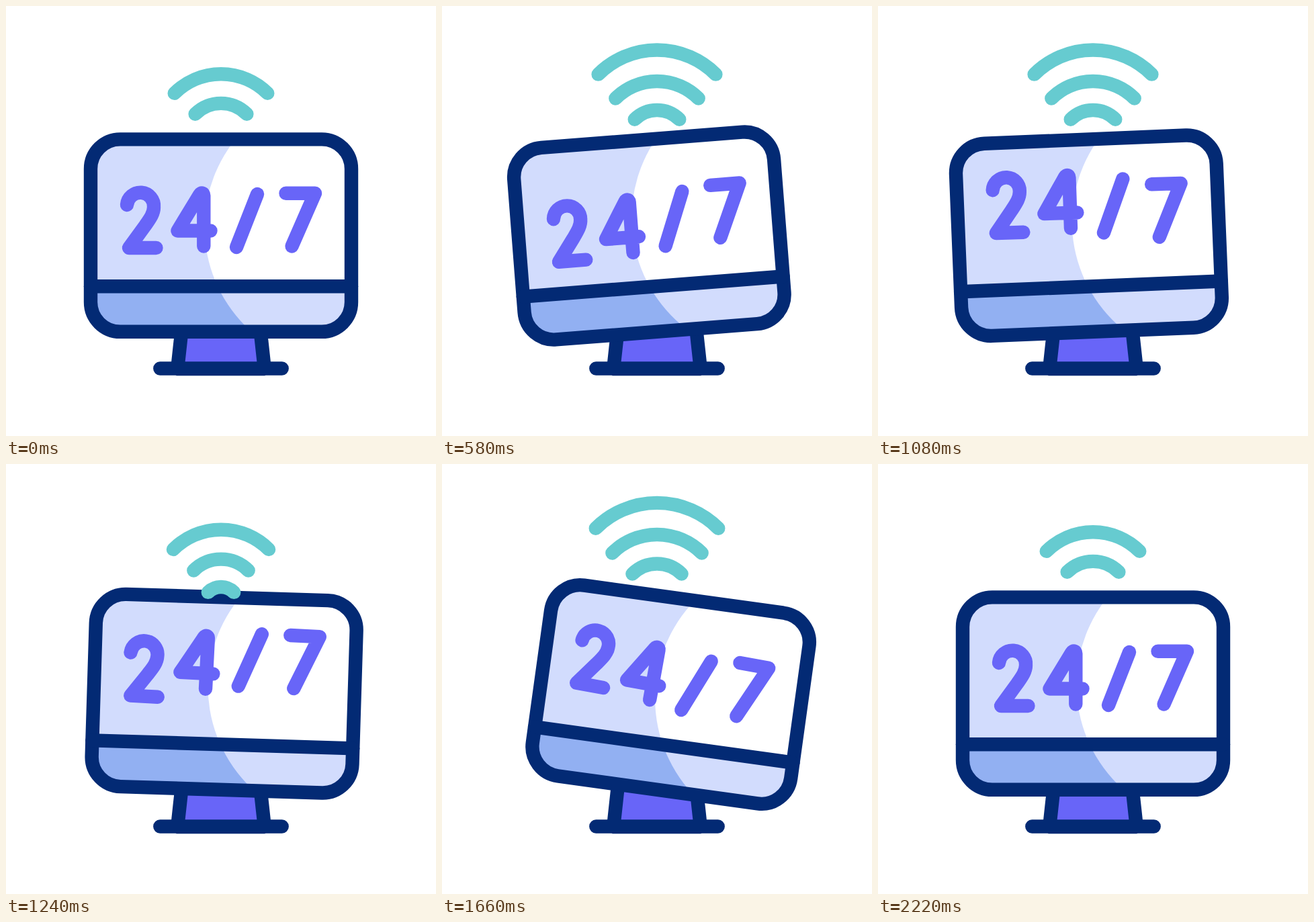
An HTML page that plays this animation: 640 px wide and 640 px high, repeating every 2400 ms.

```html
<!DOCTYPE html>
<html lang="en">
<head>
<meta charset="utf-8">
<title>24/7 monitor</title>
<style>
  html, body { margin: 0; width: 100%; height: 100%; overflow: hidden; background: #fff; }
  svg { display: block; width: 100%; height: 100%; }
  .line { fill: none; stroke-width: 20.4; stroke-linecap: round; stroke-linejoin: round; }
  .navy { stroke: #032a74; }
  .violet { stroke: #6865f8; }
  .teal { stroke: #66cbd0; }
</style>
</head>
<body>
<svg viewBox="0 0 640 640">
  <defs>
    <clipPath id="screen"><rect x="126" y="198.4" width="388" height="286.4" rx="44"/></clipPath>
    <clipPath id="glow"><circle id="spot" cx="504.5" cy="329" r="209"/></clipPath>
  </defs>

  <path d="M262 472H378L385 540H255Z" fill="#6865f8"/>
  <path class="line navy" d="M262.3 475L255.2 540H384.8L377.7 475M229.3 539.5H410.7"/>

  <g id="monitor">
    <g clip-path="url(#screen)">
      <rect x="116" y="188" width="408" height="230" fill="#d2dcfd"/>
      <rect x="116" y="417" width="408" height="78" fill="#92b0f2"/>
      <g clip-path="url(#glow)">
        <rect x="116" y="188" width="408" height="230" fill="#fff"/>
        <rect x="116" y="417" width="408" height="78" fill="#d2dcfd"/>
      </g>
    </g>
    <rect class="line navy" x="126" y="198.4" width="388" height="286.4" rx="44"/>
    <path class="line navy" d="M126 417.3H514"/>
    <g id="glyphs" class="line violet">
      <path d="M180 296A20 20 0 0 1 220 299.5C220 309 214 317 207 327L183 360H223.5"/>
      <path d="M294.3 357.5V282C294.3 278 290 277.5 288.3 280.5L255.5 334.5H304.5"/>
      <path d="M374 280L343 359"/>
      <path d="M416.5 278.7H460L425.5 357.5"/>
    </g>
  </g>

  <g id="waves" class="line teal"><path/><path/><path/></g>
</svg>
<script>
const LOOP = 2400, STEP = 20;
const ACTIVE_FROM = 200, ACTIVE_TO = 2220;
const WAVE_START = 203, WAVE_PERIOD = 500;
const GLYPH_DELAY = 95, SETTLE_FROM = 1660, SETTLE_TO = 2200;

// Turning points as [ms, value], eased in between.
const TILT = [[290, 0], [770, -6.8], [1620, 8], [2180, 0]];
const LEAN = [[900, 0], [1600, 2.4], [2200, 0]];
const BOUNCE = [[200, 0], [290, -5], [560, 10], [1030, -29], [1430, 5], [1790, -24]];

const monitor = document.getElementById("monitor");
const spot = document.getElementById("spot");
const glyphs = [...document.getElementById("glyphs").children];
const waves = [...document.getElementById("waves").children];

const mix = (a, b, u) => a + (b - a) * u;
const clamp = u => Math.min(1, Math.max(0, u));
const smooth = u => u * u * (3 - 2 * u);
const ramp = (from, to, t) => smooth(clamp((t - from) / (to - from)));

// Each turning point pulls the value from the one before it.
function eased(keys, t) {
  return keys.reduce((value, [time, goal], i) =>
    i ? value + (goal - keys[i - 1][1]) * ramp(keys[i - 1][0], time, t) : goal, 0);
}

function drawArc(wave, radius, cy) {
  const d = radius * Math.SQRT1_2;
  wave.setAttribute("d", `M${320 - d} ${cy - d}A${radius} ${radius} 0 0 1 ${320 + d} ${cy - d}`);
}

// Every arc grows into the place of the next one, then the wave restarts.
function drawWaves(t) {
  const active = t >= ACTIVE_FROM && t < ACTIVE_TO;
  const phase = active ? Math.max(0, t - WAVE_START) / WAVE_PERIOD % 1 : 0;
  drawArc(waves[0], mix(25, 54.3, phase), mix(211, 199.2, phase));
  drawArc(waves[1], mix(54.3, 98, phase), 199.2);
  drawArc(waves[2], mix(98, 132, phase), mix(199.2, 185.8, phase));
  waves[0].setAttribute("visibility", active ? "visible" : "hidden");
}

// The glyphs ripple one after another, then sink back to the baseline together.
function drawGlyphs(t, lean) {
  const strength = 1 - ramp(SETTLE_FROM, SETTLE_TO, t);
  glyphs.forEach((glyph, i) => {
    const dy = strength * eased(BOUNCE, Math.min(t, SETTLE_FROM) - i * GLYPH_DELAY);
    glyph.setAttribute("transform", `translate(0 ${dy}) rotate(${lean} ${200 + 80 * i} 250)`);
  });
}

function draw(t) {
  const lean = eased(LEAN, t);
  monitor.setAttribute("transform", `rotate(${eased(TILT, t)} 320 492)`);
  spot.setAttribute("cy", 329 - 3 * lean);
  drawGlyphs(t, lean);
  drawWaves(t);
}

const start = performance.now();
function tick() {
  const t = (performance.now() - start) % LOOP;
  draw(Math.floor(t / STEP) * STEP);
  requestAnimationFrame(tick);
}
tick();
</script>
</body>
</html>
```
